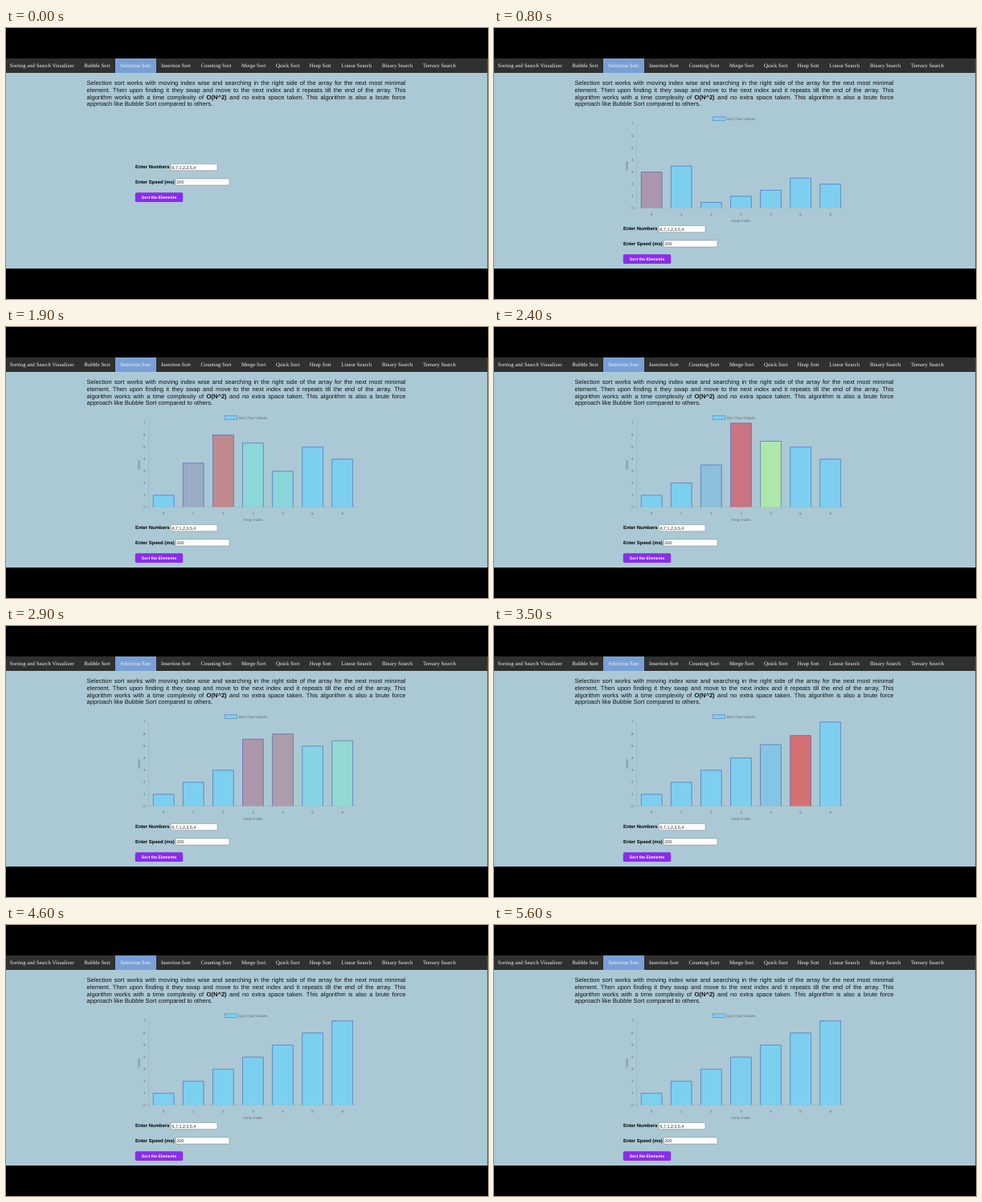
Recreate the animation shown at these times as an HTML page with a canvas. Size 600 by 338 pixels, loop 5.7 s.

```html
<!DOCTYPE html>
<html lang="en">
<head>
<meta charset="utf-8">
<title>Selection Sort</title>
<style>
html, body { margin: 0; width: 100%; height: 100%; overflow: hidden; background: #000; }
canvas, svg { position: absolute; left: 0; top: 0; width: 600px; height: 338px; }
text { text-rendering: geometricPrecision; }
.nav { font: 6.72px "Liberation Serif", "Times New Roman", serif; fill: #f4f4f4; }
.sans { font-family: "Liberation Sans", Arial, sans-serif; }
.para { font-size: 7.6px; fill: #111; }
.label { font-size: 5.95px; font-weight: bold; fill: #000; }
.field { font-size: 5.4px; fill: #222; }
.button { font-size: 5.12px; font-weight: bold; fill: #fff; }
.tick { font-size: 4.7px; fill: #666c70; }
</style>
</head>
<body>
<canvas id="stage"></canvas>
<svg id="words" viewBox="0 0 600 338"><g id="page"></g><g id="form"></g><g id="chart"></g></svg>
<script>
const LOOP = 5700, TICK = 100, SHOW = 600, DURATION = 1000, FORM_DROP = 77;
const BASE = [125, 207, 240], RED = [215, 96, 107], GREEN = [203, 246, 128];
const EDGE = 'rgb(96,118,190)';
const AXIS = { x: 177.6, y: 224.6, step: 37.1, unit: 15.05, bar: 26.6 };
const INPUT = [6, 7, 1, 2, 3, 5, 4];
const BEATS = [640, 880, 1075, 1275, 1465, 1660, 1855, 2045, 2240, 2410, 2580, 2750, 2920, 3090, 3520];

const $ = id => document.getElementById(id);
const page = $('page'), form = $('form'), chart = $('chart');
const canvas = $('stage'), ctx = canvas.getContext('2d');
const dpr = window.devicePixelRatio || 1;
canvas.width = 600 * dpr;
canvas.height = 338 * dpr;

function addText(parent, cls, x, y, str, anchor = 'start') {
  const el = document.createElementNS('http://www.w3.org/2000/svg', 'text');
  el.setAttribute('class', cls);
  el.setAttribute('x', x);
  el.setAttribute('y', y);
  el.setAttribute('text-anchor', anchor);
  // **word** becomes bold
  String(str).split('**').forEach((part, i) => {
    const span = document.createElementNS(el.namespaceURI, 'tspan');
    if (i % 2) span.setAttribute('font-weight', 'bold');
    span.textContent = part;
    el.appendChild(span);
  });
  parent.appendChild(el);
  return el;
}

function justify(el, str, width) {
  const gaps = str.split(' ').length - 1;
  el.style.wordSpacing = (width - el.getComputedTextLength()) / gaps + 'px';
}

function buildText() {
  const menu = {
    'Sorting and Search Visualizer': 4.8, 'Bubble Sort': 97.3, 'Selection Sort': 142.3,
    'Insertion Sort': 193, 'Counting Sort': 242.4, 'Merge Sort': 293, 'Quick Sort': 336,
    'Heap Sort': 377.8, 'Linear Search': 417.6, 'Binary Search': 468, 'Ternary Search': 519
  };
  for (const name in menu) addText(page, 'nav', menu[name], 49, name);

  const lines = [
    'Selection sort works with moving index wise and searching in the right side of the array for the next most minimal',
    'element. Then upon finding it they swap and move to the next index and it repeats till the end of the array. This',
    'algorithm works with a time complexity of **O(N^2)** and no extra space taken. This algorithm is also a brute force',
    'approach like Bubble Sort compared to others.'
  ];
  lines.forEach((line, i) => {
    const el = addText(page, 'sans para', 100.5, 71 + i * 8.8, line);
    if (i < 3) justify(el, line, 397);
  });

  addText(form, 'sans label', 161, 175.3, 'Enter Numbers');
  addText(form, 'sans field', 206.4, 175.5, INPUT.join(','));
  addText(form, 'sans label', 161, 193.6, 'Enter Speed (ms)');
  addText(form, 'sans field', 212.6, 193.8, '200');
  addText(form, 'sans button', 190.6, 213, 'Sort the Elements', 'middle');

  addText(chart, 'sans tick', 290, 114.8, 'Bar Chart Values');
  for (let v = 0; v <= 7; v++) addText(chart, 'sans tick', 173.6, AXIS.y + 1.5 - v * AXIS.unit, v, 'end');
  INPUT.forEach((_, i) => addText(chart, 'sans tick', center(i), 233.8, i, 'middle'));
  addText(chart, 'sans tick', 307.5, 241.8, 'Array Index', 'middle');
  addText(chart, 'sans tick', 0, 0, 'Value', 'middle').setAttribute('transform', 'translate(166.8 172) rotate(-90)');
}

const center = i => AXIS.x + (i + 0.5) * AXIS.step;

// Run the sort once, noting the values and colours at every pause.
function record() {
  const vals = INPUT.slice(), n = vals.length, states = [];
  const snap = (cur, min) => states.push({
    at: BEATS[states.length],
    vals: vals.slice(),
    colors: vals.map((_, k) => k === cur ? RED : k === min ? GREEN : BASE)
  });
  for (let i = 0; i < n - 1; i++) {
    let min = i;
    snap(i, i);
    for (let j = i + 1; j < n; j++) {
      if (vals[j] < vals[min]) {
        min = j;
        snap(i, min);
      }
    }
    [vals[i], vals[min]] = [vals[min], vals[i]];
  }
  snap(-1, -1);
  return states;
}

const states = record();
const easeOutQuart = p => 1 - Math.pow(1 - Math.min(1, Math.max(0, p)), 4);

// Each new target starts a fresh ease from wherever the value is.
function follow(start, pick, t) {
  let from = start, to = start, began = 0;
  const at = time => {
    const k = easeOutQuart((time - began) / DURATION);
    return from.map((v, i) => v + (to[i] - v) * k);
  };
  for (const s of states) {
    if (s.at > t) break;
    const next = pick(s);
    if (next.every((v, i) => v === to[i])) continue;
    from = at(s.at);
    to = next;
    began = s.at;
  }
  return at(t);
}

function rect(color, x, y, w, h) {
  ctx.fillStyle = color;
  ctx.fillRect(x, y, w, h);
}

function roundRect(fill, stroke, x, y, w, h, r) {
  ctx.beginPath();
  ctx.roundRect(x, y, w, h, r);
  ctx.fillStyle = fill;
  ctx.fill();
  if (!stroke) return;
  ctx.strokeStyle = stroke;
  ctx.lineWidth = 0.6;
  ctx.stroke();
}

function drawBar(i, t) {
  const [value] = follow([0], s => [s.vals[i]], t);
  const rgb = follow(BASE, s => s.colors[i], t).map(Math.round);
  const x = center(i) - AXIS.bar / 2, h = value * AXIS.unit;
  if (h < 0.1) return;
  rect(`rgb(${rgb})`, x, AXIS.y - h, AXIS.bar, h);
  ctx.strokeStyle = EDGE;
  ctx.lineWidth = 0.8;
  ctx.beginPath();
  ctx.moveTo(x + 0.4, AXIS.y);
  ctx.lineTo(x + 0.4, AXIS.y - h + 0.4);
  ctx.lineTo(x + AXIS.bar - 0.4, AXIS.y - h + 0.4);
  ctx.lineTo(x + AXIS.bar - 0.4, AXIS.y);
  ctx.stroke();
}

function drawChart(t) {
  const faint = 'rgba(0,0,0,.1)';
  rect(faint, AXIS.x - 0.3, 119, 0.6, AXIS.y - 119 + 3);
  rect(faint, AXIS.x - 3, AXIS.y - 0.3, AXIS.step * 7 + 3, 0.6);
  roundRect('rgb(125,207,240)', EDGE, 272.2, 110.7, 15.6, 4.8, 0);
  INPUT.forEach((_, i) => drawBar(i, t));
}

function draw(t) {
  const shown = t >= SHOW, dy = shown ? FORM_DROP : 0;
  ctx.setTransform(dpr, 0, 0, dpr, 0, 0);
  rect('#000', 0, 0, 600, 338);
  rect('rgb(171,201,212)', 0, 38, 599.5, 262);
  rect('rgb(48,48,48)', 0, 38, 599.5, 18);
  rect('rgb(120,160,214)', 136, 38, 51, 18);
  if (shown) drawChart(t);
  roundRect('#fff', '#858c90', 205.2, 169.6 + dy, 57.8, 8.2, 0.6);
  roundRect('#fff', '#858c90', 211.2, 187.9 + dy, 66.8, 8.2, 0.6);
  roundRect('rgb(138,44,236)', null, 160.8, 205.3 + dy, 59.4, 11.7, 1.6);
  form.setAttribute('transform', `translate(0 ${dy})`);
  chart.style.display = shown ? '' : 'none';
}

buildText();
const began = performance.now();
function frame() {
  const t = (performance.now() - began) % LOOP;
  draw(Math.floor(t / TICK) * TICK);
  requestAnimationFrame(frame);
}
frame();
</script>
</body>
</html>
```
